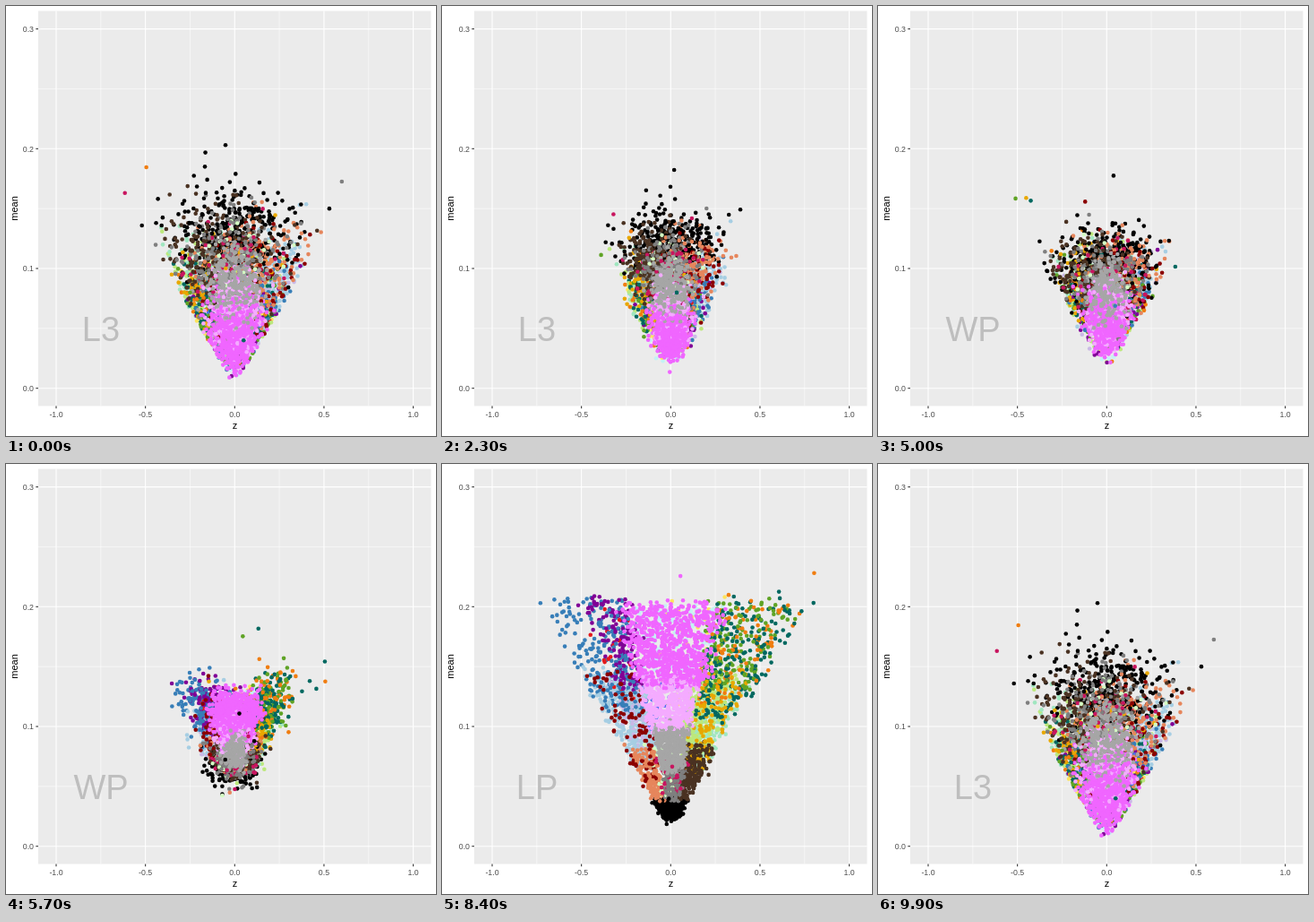
Write an HTML page with a canvas that moves like this. It is 480 by 480 pixels and loops after 10000 ms.

```html
<!DOCTYPE html>
<html lang="en">
<head>
<meta charset="utf-8">
<title>Scatter states</title>
<style>
  html, body { margin: 0; width: 100%; height: 100%; overflow: hidden; background: #fff; }
  svg, canvas { position: absolute; left: 0; top: 0; width: 480px; height: 480px; display: block; }
  text { font-family: "Liberation Sans", Arial, sans-serif; }
</style>
</head>
<body>
<svg id="plot" viewBox="0 0 480 480" xmlns="http://www.w3.org/2000/svg"></svg>
<canvas id="dots"></canvas>
<script>
const SVG = "http://www.w3.org/2000/svg";
const plot = document.getElementById("plot");
const canvas = document.getElementById("dots");
const ctx = canvas.getContext("2d");
const ratio = window.devicePixelRatio || 1;
canvas.width = canvas.height = Math.round(480 * ratio);
ctx.scale(ratio, ratio);

const px = z => 255.3 + 199.3 * z;
const py = m => 426.7 - 1337 * m;

function add(tag, attrs, content) {
  const el = document.createElementNS(SVG, tag);
  for (const k in attrs) el.setAttribute(k, attrs[k]);
  if (content) el.textContent = content;
  plot.appendChild(el);
  return el;
}

function line(x1, y1, x2, y2, stroke, width) {
  add("line", { x1, y1, x2, y2, stroke, "stroke-width": width });
}

function label(x, y, size, fill, anchor, str, extra) {
  return add("text", { x, y, "font-size": size, fill, "text-anchor": anchor, ...extra }, str);
}

function drawAxes() {
  const L = 36, R = 474.5, T = 5.5, B = 446.5;
  add("rect", { x: L, y: T, width: R - L, height: B - T, fill: "#ebebeb" });
  for (const z of [-0.75, -0.25, 0.25, 0.75]) line(px(z), T, px(z), B, "#fff", 0.53);
  for (const m of [0.05, 0.15, 0.25]) line(L, py(m), R, py(m), "#fff", 0.53);
  for (const z of [-1, -0.5, 0, 0.5, 1]) {
    line(px(z), T, px(z), B, "#fff", 1.07);
    line(px(z), B, px(z), B + 2.7, "#333", 1.07);
    label(px(z), 458.6, 8.8, "#4d4d4d", "middle", z.toFixed(1));
  }
  for (const m of [0, 0.1, 0.2, 0.3]) {
    line(L, py(m), R, py(m), "#fff", 1.07);
    line(L - 2.7, py(m), L, py(m), "#333", 1.07);
    label(31, py(m) + 3.2, 8.8, "#4d4d4d", "end", m.toFixed(1));
  }
  label(255.5, 472, 11, "#000", "middle", "z");
  label(0, 0, 11, "#000", "middle", "mean", { transform: "translate(13.2 226) rotate(-90)" });
}

drawAxes();
const stateLabel = label(106, 373.5, 38, "#bebebe", "middle", "L3");

// Seeded random numbers
let seed = 20417;
function rand() {
  seed = (seed + 0x6D2B79F5) | 0;
  let r = Math.imul(seed ^ (seed >>> 15), 1 | seed);
  r = (r + Math.imul(r ^ (r >>> 7), 61 | r)) ^ r;
  return ((r ^ (r >>> 14)) >>> 0) / 4294967296;
}
const gauss = () => Math.sqrt(-2 * Math.log(1 - rand())) * Math.cos(2 * Math.PI * rand());

// colour, count, mean range, range of z / (4 mean) in state LP
const groups = [
  ["#c4f2f4", 240, 0.15, 0.212, -0.3, 0.4],
  ["#a0e6c0", 200, 0.06, 0.14, 0.4, 0.85],
  ["#a6cee3", 460, 0.065, 0.148, -0.28, -0.88],
  ["#cab8e6", 130, 0.085, 0.145, -0.3, -0.68],
  ["#bce87c", 360, 0.07, 0.15, 0.24, 0.68],
  ["#fde45c", 45, 0.12, 0.217, -0.1, 0.42],
  ["#e41a1c", 22, 0.13, 0.21, -0.35, -0.66],
  ["#377eb8", 250, 0.115, 0.216, -0.34, -0.92],
  ["#800096", 170, 0.138, 0.218, -0.32, -0.6],
  ["#5fa325", 180, 0.135, 0.216, 0.3, 0.88],
  ["#006860", 220, 0.11, 0.216, 0.34, 0.97],
  ["#f07d10", 95, 0.125, 0.216, 0.34, 0.95],
  ["#e8a800", 130, 0.06, 0.15, 0.34, 0.84],
  ["#000000", 380, 0.012, 0.033, -0.8, 0.78],
  ["#5070f0", 30, 0.1, 0.15, -0.3, 0.2],
  ["#e6865c", 190, 0.034, 0.08, -0.3, -0.85],
  ["#8b0000", 100, 0.05, 0.155, -0.34, -0.9],
  ["#4a3222", 260, 0.034, 0.083, 0.34, 0.85],
  ["#d4ffc4", 35, 0.04, 0.08, -0.45, 0.1],
  ["#7f7f7f", 210, 0.034, 0.065, -0.2, 0.38],
  ["#c8155f", 50, 0.04, 0.07, -0.3, 0.36],
  ["#f4abff", 460, 0.1, 0.145, -0.32, 0.28],
  ["#f066ff", 860, 0.14, 0.212, -0.33, 0.35],
  ["#a6a6a6", 460, 0.062, 0.1, -0.23, 0.28]
];

// colour, then z and mean in states L3, WP and LP
const strays = [
  ["#f07d10", -0.495, 0.1845, 0.167, 0.0546, 0.89, 0.231],
  ["#006860", 0.05, 0.04, -0.505, 0.153, 0.85, 0.214],
  ["#006860", -0.2, 0.07, 0.367, 0.094, 0.66, 0.222],
  ["#377eb8", 0.25, 0.106, 0.1, 0.06, -0.795, 0.2095],
  ["#5fa325", -0.25, 0.08, -0.59, 0.156, 0.76, 0.197],
  ["#f066ff", -0.03, 0.009, 0.03, 0.02, 0.06, 0.24],
  ["#000000", 0.53, 0.15, 0.19, 0.148, 0.02, 0.02],
  ["#000000", -0.167, 0.185, -0.1, 0.11, 0, 0.03],
  ["#000000", 0.005, 0.179, 0.04, 0.187, 0.01, 0.025],
  ["#7f7f7f", 0.6, 0.1725, -0.37, 0.118, 0.04, 0.05],
  ["#c8155f", -0.615, 0.163, 0.1, 0.12, 0.05, 0.06],
  ["#e8a800", -0.05, 0.1, -0.495, 0.162, 0.25, 0.11]
];

// Where a dot lands in a state that mirrors LP: high means fall, sides swap
function mirrored(m, u, low, height, spread, noise, cone) {
  const edge = Math.max(0, Math.abs(u) - 0.3);
  const base = low + height * Math.exp((0.02 - m) / 0.12) + 0.3 * m * edge;
  for (let tries = 0; tries < 30; tries++) {
    const wide = rand() < 0.03 ? 1.5 : 1;
    const mean = base + gauss() * noise * wide;
    const z = -1.8 * base * u + gauss() * spread * wide;
    if (mean > 0.009 && Math.abs(z) < cone * (mean - 0.003)) return [z, mean];
  }
  return [0, base];
}

function makeDots() {
  const dots = [];
  groups.forEach(([color, count, m0, m1, u0, u1], row) => {
    const oneSided = u0 * u1 > 0;
    const tight = Math.abs(u0 + u1) < 0.2 && m0 > 0.05;
    const spread = tight ? 0.065 : 0.14;
    const noise = tight ? 0.014 : 0.018;
    for (let i = 0; i < count; i++) {
      const grow = m0 < 0.02 ? Math.sqrt(rand()) : Math.pow(rand(), 1.1);
      const m = Math.max(0.01, m0 + (m1 - m0) * grow + gauss() * (m0 < 0.04 ? 0.0015 : 0.003));
      const side = Math.pow(rand(), oneSided ? 1.4 : 1);
      const u = Math.max(-0.97, Math.min(0.97, u0 + (u1 - u0) * side + gauss() * 0.035));
      const a = mirrored(m, u, 0.01, 0.125, spread, noise, 4);
      const b = mirrored(m, u, 0.022, 0.092, spread * 0.8, noise * 0.9, 3.7);
      dots.push({ color, order: row + rand() * 10, at: [a, b, [4 * m * u, m]] });
    }
  });
  for (const [color, ...v] of strays) {
    dots.push({ color, order: 40, at: [v.slice(0, 2), v.slice(2, 4), v.slice(4)] });
  }
  return dots.sort((p, q) => p.order - q.order);
}

const dots = makeDots();
const names = ["L3", "WP", "LP"];
// first step, number of steps, from, to
const moves = [[17, 17, 0, 1], [50, 17, 1, 2], [84, 16, 2, 0]];

function pose(step) {
  let current = { from: 0, to: 0, k: 0 };
  for (const [start, count, from, to] of moves) {
    if (step >= start) current = { from, to, k: Math.min(1, (step - start + 1) / count) };
  }
  return current;
}

function render(step) {
  const { from, to, k } = pose(step);
  stateLabel.textContent = names[k > 0.5 ? to : from];
  ctx.clearRect(0, 0, 480, 480);
  for (const { color, at } of dots) {
    const [z0, m0] = at[from], [z1, m1] = at[to];
    ctx.fillStyle = color;
    ctx.beginPath();
    ctx.arc(px(z0 + (z1 - z0) * k), py(m0 + (m1 - m0) * k), 2.3, 0, 2 * Math.PI);
    ctx.fill();
  }
}

let shown = -1;
function tick() {
  const step = Math.floor((performance.now() % 10000) / 100);
  if (step !== shown) render(shown = step);
  requestAnimationFrame(tick);
}
tick();
</script>
</body>
</html>
```
